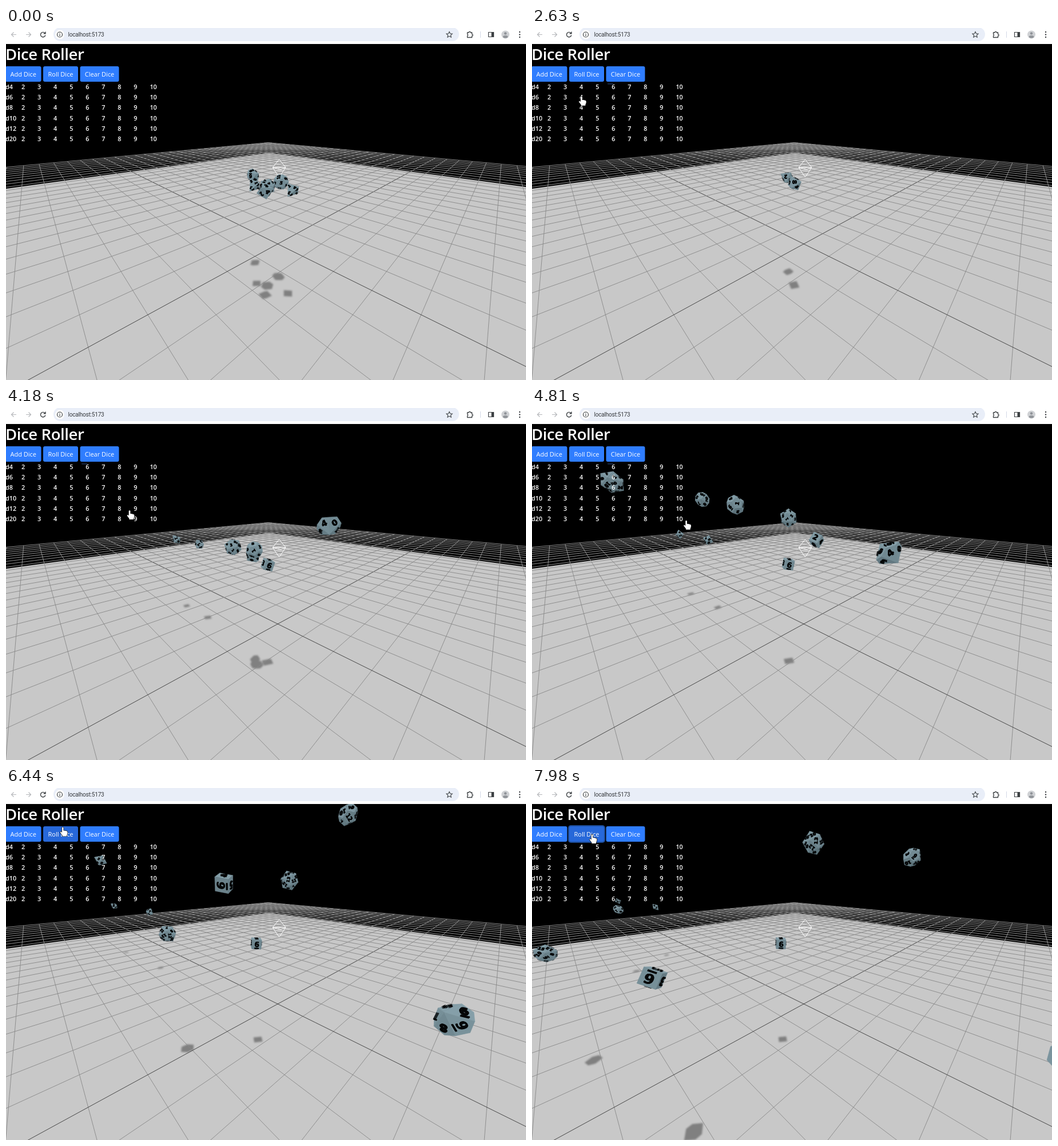
Animation, 909 px wide and 616 px high, one loop 8 s. Source, as an HTML page with a canvas:

```html
<!DOCTYPE html>
<html lang="en">
<head>
<meta charset="utf-8">
<title>Dice Roller</title>
<style>
html, body { margin: 0; width: 100%; height: 100%; overflow: hidden; background: #000; }
canvas { display: block; }
</style>
</head>
<body>
<canvas id="stage" width="909" height="616"></canvas>
<script>
const ctx = document.getElementById('stage').getContext('2d');
const LOOP = 8000, STEP = 126.67;
const SANS = '"Open Sans", "Noto Sans", sans-serif';

// ---- vectors: x right, y down, z away; the eye is the origin
const dot = (a, b) => a[0] * b[0] + a[1] * b[1] + a[2] * b[2];
const add = (a, b, k = 1) => a.map((v, i) => v + b[i] * k);
const mul = (a, k) => a.map(v => v * k);
const unit = a => mul(a, 1 / Math.hypot(...a));
const cross = (a, b) => [a[1] * b[2] - a[2] * b[1], a[2] * b[0] - a[0] * b[2], a[0] * b[1] - a[1] * b[0]];
const mean = pts => mul(pts.reduce((s, p) => add(s, p)), 1 / pts.length);

// ---- camera
const FOCAL = 385, PITCH = Math.atan2(160.5, FOCAL), EYE = 3.72;
const SIN = Math.sin(PITCH), COS = Math.cos(PITCH);
const depth = p => p[2] * COS + p[1] * SIN;
const project = p => {
  const k = FOCAL / depth(p);
  return [454.5 + p[0] * k, 322 + (p[1] * COS - p[2] * SIN) * k];
};

// ---- polyhedra
function hull(points) {
  const n = points.length, size = Math.max(...points.map(p => Math.hypot(...p)));
  const verts = points.map(p => mul(p, 1 / size)), found = new Map();
  for (let i = 0; i < n; i++) for (let j = i + 1; j < n; j++) for (let k = j + 1; k < n; k++) {
    let nor = unit(cross(add(verts[j], verts[i], -1), add(verts[k], verts[i], -1)));
    let d = dot(nor, verts[i]);
    if (d < 0) { nor = mul(nor, -1); d = -d; }
    if (verts.some(v => dot(nor, v) > d + 1e-3)) continue;
    found.set(nor.map(v => Math.round(v * 50) + 0).join(), { nor, d });
  }
  return [...found.values()].map(({ nor, d }) => {
    const pts = verts.filter(v => dot(nor, v) > d - 5e-3), mid = mean(pts);
    const x = unit(add(pts[0], mid, -1)), y = cross(nor, x);
    const angle = p => Math.atan2(dot(add(p, mid, -1), y), dot(add(p, mid, -1), x));
    pts.sort((a, b) => angle(a) - angle(b));
    return { nor, pts, mid };
  });
}

const PHI = (1 + Math.sqrt(5)) / 2, S = [-1, 1];
const cyclic = (a, b) => S.flatMap(i => S.flatMap(j => {
  const p = i * a, q = j * b;
  return [[0, p, q], [p, q, 0], [q, 0, p]];
}));
const cube = S.flatMap(x => S.flatMap(y => S.map(z => [x, y, z])));
const octa = S.flatMap(s => [[s, 0, 0], [0, s, 0], [0, 0, s]]);
const belt = Math.tan(Math.PI / 10) ** 2;
const kite = [[0, 1, 0], [0, -1, 0]];
for (let i = 0; i < 10; i++) {
  const a = i * Math.PI / 5;
  kite.push([Math.cos(a), i % 2 ? belt : -belt, Math.sin(a)]);
}
const SHAPES = {
  d4: { faces: hull(cube.filter(p => p[0] * p[1] * p[2] > 0)), size: 0.5 },
  d6: { faces: hull(cube), size: 0.9 },
  d8: { faces: hull(octa), size: 0.7 },
  d10: { faces: hull(kite), size: 0.65 },
  d12: { faces: hull(cube.concat(cyclic(1 / PHI, PHI))), size: 0.56 },
  d20: { faces: hull(cyclic(1, PHI)), size: 0.42 }
};

// ---- dice: birth time, [x, z] there, launch speed [x, z, up]
const RADIUS = 0.165, FLOOR = 2.5, GRAVITY = 1.17, BOUNCE = 0.4, LAMP = 2.85;
const dice = [];
const die = (shape, birth, from, speed = [0, 0, 0], { drag = 1e-6, until = LOOP } = {}) =>
  dice.push({ shape: SHAPES[shape], birth, from, speed, drag, until, seed: dice.length + 1 });

const cleared = { until: 950 };
die('d10', 0, [-0.31, 5.2], undefined, cleared);
die('d4', 0, [-0.23, 4.34], undefined, cleared);
die('d20', 0, [0.03, 4.26], undefined, cleared);
die('d12', 0, [0.32, 4.6], undefined, cleared);
die('d8', 0, [-0.02, 3.95], undefined, cleared);
die('d4', 0, [0.51, 4.0], undefined, cleared);

die('d8', 2500, [0.1, 4.6], [-1.25, 1.22, 0.4]);
die('d8', 2640, [0, 4.3], [2.4, -1, 2.8], { until: 4100 });
die('d6', 2750, [0.65, 4.15], [-0.72, 0.28, 0.2], { drag: 0.8 });
die('d10', 2900, [0, 4.4], [0.8, -1.22, 1.45], { drag: 0.3 });
die('d8', 3500, [-1.6, 6.3], [-2.1, 1.85, 0.2]);
die('d20', 4000, [0, 4.3], [-3.5, -0.5, 2.3], { until: 5300 });
die('d12', 4000, [0, 4.3], [-1.26, 0, 1.88], { until: 5600 });
die('d10', 4100, [0, 4.3], [-3.5, 2.4, 2.15], { drag: 0.4 });
die('d20', 4200, [-0.28, 4.3], [0.35, 0, 1.85], { until: 5730 });
die('d6', 4500, [0.69, 4.64], [-0.65, -0.68, 1.75]);
die('d12', 4850, [0.5, 4.4], [0.57, 0.1, 2.35]);
die('d20', 5340, [0, 4.45], [-1.68, -0.25, 0.9]);
die('d20', 5730, [0.46, 4.45], [-0.06, -0.27, 2.09]);

function rotator(angles) {
  const c = angles.map(Math.cos), s = angles.map(Math.sin);
  return ([x, y, z]) => {
    [y, z] = [y * c[0] - z * s[0], y * s[0] + z * c[0]];
    [x, z] = [x * c[1] + z * s[1], z * c[1] - x * s[1]];
    return [x * c[2] - y * s[2], x * s[2] + y * c[2], z];
  };
}

function pose(d, t) {
  let s = (t - d.birth) / 1000, up = d.speed[2];
  const run = (1 - Math.exp(-d.drag * s)) / d.drag;
  while (up > 0.1 && s > 2 * up / GRAVITY) {
    s -= 2 * up / GRAVITY;
    up *= BOUNCE;
  }
  const height = FLOOR + (up > 0.1 ? up * s - GRAVITY * s * s / 2 : 0);
  const center = [d.from[0] + d.speed[0] * run, EYE - height, d.from[1] + d.speed[1] * run];
  const roll = run * Math.hypot(d.speed[0], d.speed[1]) * 0.9;
  const turn = rotator([d.seed * 1.3 + roll, d.seed * 0.8 + roll * 0.6, d.seed * 2.1]);
  const place = p => add(center, turn(p), RADIUS);
  const faces = d.shape.faces.map((f, i, all) => ({
    nor: turn(f.nor), mid: place(f.mid), pts: f.pts.map(place), label: all.length === 10 ? i : i + 1
  }));
  return { center, height, faces, size: d.shape.size * RADIUS, far: depth(center) };
}

function outline(pts) {
  pts.map(project).forEach((p, i) => i ? ctx.lineTo(...p) : ctx.moveTo(...p));
  ctx.closePath();
}

// Raised numeral: a few copies lifted off the face.
function stamp(text, pos, nor, up, size) {
  const down = mul(up, -1), right = cross(nor, down);
  ctx.fillStyle = '#050708';
  for (let lift = 0; lift < 0.12; lift += 0.035) {
    const p = add(pos, nor, lift * RADIUS);
    const o = project(p), x = project(add(p, right, size / 2)), y = project(add(p, down, size / 2));
    ctx.setTransform((x[0] - o[0]) / 10, (x[1] - o[1]) / 10, (y[0] - o[0]) / 10, (y[1] - o[1]) / 10, ...o);
    ctx.fillText(text, 0, 1);
    if (text === 6 || text === 9) ctx.fillRect(-6, 9, 12, 2.5);
  }
  ctx.resetTransform();
}

function number(f, size, count) {
  if (count === 4) {
    f.pts.forEach((p, i) => {
      const up = unit(add(p, f.mid, -1));
      stamp(1 + (f.label + i) % 4, add(f.mid, up, 0.48 * RADIUS), f.nor, up, size);
    });
  } else {
    const top = count === 6 ? mean(f.pts.slice(0, 2)) : f.pts[0];
    stamp(f.label, f.mid, f.nor, unit(add(top, f.mid, -1)), size);
  }
}

function drawDie({ faces, size }) {
  ctx.font = 'bold 20px "DejaVu Sans", sans-serif';
  ctx.textAlign = 'center';
  ctx.textBaseline = 'middle';
  const facing = f => -dot(f.nor, unit(f.mid));
  const front = faces.filter(f => facing(f) > 0);
  faces.filter(f => facing(f) <= 0 && facing(f) > -0.3).forEach(f => number(f, size, faces.length));
  for (const f of front) {
    const k = Math.min(1, Math.max(0, 0.5 - f.nor[1] * 0.5 - f.nor[0] * 0.1));
    ctx.fillStyle = ctx.strokeStyle = `rgb(${90 + 44 * k},${112 + 48 * k},${120 + 50 * k})`;
    ctx.lineWidth = 0.6;
    ctx.beginPath();
    outline(f.pts);
    ctx.fill();
    ctx.stroke();
  }
  front.forEach(f => number(f, size, faces.length));
}

// ---- ground, turned by 45 degrees
const PLANE = 15.5, GRID = 25, NEAR = -10.4;
const ground = (u, v) => [0.382 + (v - u) * Math.SQRT1_2, EYE, 6.217 + (u + v) * Math.SQRT1_2];

function gridLines(color, middle) {
  ctx.lineWidth = 0.9;
  for (let i = -GRID; i <= GRID; i++) {
    const near = Math.max(-GRID, NEAR - i);
    if (near >= GRID) continue;
    ctx.strokeStyle = i ? color : middle;
    ctx.beginPath();
    ctx.moveTo(...project(ground(i, near)));
    ctx.lineTo(...project(ground(i, GRID)));
    ctx.moveTo(...project(ground(near, i)));
    ctx.lineTo(...project(ground(GRID, i)));
    ctx.stroke();
  }
}

function drawGround(live) {
  gridLines('#a0a0a0', '#a0a0a0');
  ctx.save();
  ctx.beginPath();
  [ground(PLANE, -PLANE), ground(PLANE, PLANE), ground(-PLANE, PLANE)].forEach(p => ctx.lineTo(...project(p)));
  ctx.lineTo(1620, 700);
  ctx.lineTo(-670, 700);
  ctx.fillStyle = '#c8c8c8';
  ctx.fill();
  ctx.clip();
  // Only dice below the lamp cast a shadow, straight down.
  ctx.beginPath();
  for (const p of live) if (p.height < LAMP) {
    for (const f of p.faces) if (f.nor[1] < 0) outline(f.pts.map(([x, , z]) => [x, EYE, z]));
  }
  ctx.fillStyle = 'rgba(0,0,0,.36)';
  ctx.filter = 'blur(1.6px)';
  ctx.fill();
  ctx.filter = 'none';
  gridLines('#888', '#383838');
  ctx.restore();
}

// ---- interface
function stroke(color, width, path) {
  ctx.strokeStyle = color;
  ctx.lineWidth = width;
  ctx.stroke(new Path2D(path));
}

function disc(x, y, r, color) {
  ctx.fillStyle = color;
  ctx.beginPath();
  ctx.arc(x, y, r, 0, 7);
  ctx.fill();
}

function box(x, y, w, h, r, color) {
  ctx.fillStyle = color;
  ctx.beginPath();
  ctx.roundRect(x, y, w, h, r);
  ctx.fill();
}

function label(text, x, y, font, color = '#fff', align = 'left') {
  ctx.font = font;
  ctx.fillStyle = color;
  ctx.textAlign = align;
  ctx.textBaseline = 'alphabetic';
  ctx.fillText(text, x, y);
}

const CLICKS = { clear: 860, add: 1740, roll: 7420 };
const pressed = (name, t) => t > CLICKS[name] && t < CLICKS[name] + 140;

function button(text, x, w, press, hover, focus) {
  if (focus) box(x - 2, 65, w + 4, 31, 5, '#1c4a94');
  box(x, 67, w, 27, 3, press ? '#5f7079' : hover ? '#2768d9' : '#2f7dff');
  label(text, x + w / 2, 85, `500 11px ${SANS}`, '#fff', 'center');
}

function drawPanel(t) {
  ctx.letterSpacing = '-0.4px';
  label('Dice Roller', -1, 56, `600 27.5px ${SANS}`);
  ctx.letterSpacing = '0px';
  button('Add Dice', -1, 62.5, pressed('add', t), t > 1400 && t < 2250);
  button('Roll Dice', 65, 61, pressed('roll', t), t > 6300, t > 7560);
  button('Clear Dice', 129.5, 68, pressed('clear', t), t > 700 && t < 1200, t > 1000 && t < 1740);
  if (t > 1200 && t < 5200) box(132, 96.5, 10, 2.5, 1, '#162238');
  [4, 6, 8, 10, 12, 20].forEach((n, row) => {
    const y = 107 + row * 18.2, font = `600 10.8px ${SANS}`;
    label('d' + n, -1, y, font);
    for (let c = 2; c <= 10; c++) label(c, 27 + (c - 2) * 28.05, y, font);
  });
}

function drawBrowser() {
  ctx.fillStyle = '#fff';
  ctx.fillRect(0, 0, 909, 28);
  box(83, -1, 709, 24, 12, '#e9eef8');
  stroke('#b5b7ba', 1.2, 'M18 11.5H9.5M13.5 7.5l-4 4 4 4M35 11.5h8.5M39.5 7.5l4 4-4 4');
  stroke('#3c4043', 1.4, 'M68 9a4.2 4.2 0 1 0 .8 3.5M69 6.5v3.300h-3.300');
  disc(94, 11.5, 8, '#fff');
  stroke('#3c4043', 1.2, 'M98.5 11.5a4.5 4.5 0 1 1-9 0a4.5 4.5 0 1 1 9 0M94 11v3M94 8.8v1.2');
  ctx.letterSpacing = '-0.2px';
  label('localhost:5173', 108.5, 15, '10px Roboto, sans-serif', '#35383c');
  ctx.letterSpacing = '0px';
  stroke('#3c4043', 1.1, 'M775 6.5l1.500 3.300 3.600.4-2.700 2.400.8 3.600-3.200-1.900-3.200 1.900.8-3.600-2.700-2.400 3.600-.4z');
  stroke('#3c4043', 1.3, 'M806.5 8h2.500a1.600 1.600 0 0 1 3.200 0h2.300v2.800a1.600 1.600 0 0 1 0 3.200v2.500h-8v-2.700a1.600 1.600 0 0 0 0-3z');
  stroke('#d3d9e6', 1, 'M829.5 6v11');
  stroke('#3c4043', 1.2, 'M843.5 7.5h9v8h-9z');
  ctx.fillStyle = '#3c4043';
  ctx.fillRect(848.5, 7.5, 4, 8);
  disc(873, 11.5, 7, '#cfd1d4');
  disc(873, 9.5, 2.3, '#909499');
  ctx.beginPath();
  ctx.ellipse(873, 15.3, 4.2, 2.4, 0, 0, 7);
  ctx.fill();
  for (const y of [7, 11.5, 16]) disc(898, y, 1.2, '#3c4043');
}

// ---- mouse: time, x, y
const TRAIL = [[120, 884, 598], [507, 211, 104], [740, 165, 82], [1080, 165, 82], [1500, 32, 88],
  [2020, 32, 88], [3410, 150, 157], [4810, 270, 197], [6440, 99, 68], [7100, 105, 81]];
const HAND = new Path2D('M-1.3 1Q0-.6 1.3 1V6L4 6.3 7.5 7.2 8.3 8.5V11L7 14.5V16H-.5V14.5L-4.3 9.5Q-4.3 7.8-2.8 8.2L-1.3 9.5Z');
const ARROW = new Path2D('M0 0V14L3.3 11 5.5 16 7.6 15 5.5 10.3H10Z');

function mouse(t) {
  const next = TRAIL.findIndex(k => k[0] > t);
  if (next < 1) return TRAIL[TRAIL.length - 1].slice(1);
  const a = TRAIL[next - 1], b = TRAIL[next], k = (t - a[0]) / (b[0] - a[0]);
  return [a[1] + (b[1] - a[1]) * k, a[2] + (b[2] - a[2]) * k];
}

function drawCursor(t) {
  if (t < TRAIL[0][0]) return;
  const [x, y] = mouse(t);
  if (Object.keys(CLICKS).some(name => pressed(name, t))) disc(x - 1, y, 9, 'rgba(150,180,85,.8)');
  const shape = t < 700 ? ARROW : HAND;
  ctx.save();
  ctx.translate(x, y);
  ctx.fillStyle = '#fff';
  ctx.strokeStyle = '#111';
  ctx.lineWidth = 1.4;
  ctx.stroke(shape);
  ctx.fill(shape);
  ctx.restore();
}

function draw(t) {
  ctx.fillStyle = '#000';
  ctx.fillRect(0, 0, 909, 616);
  const live = dice
    .filter(d => t >= d.birth && t < d.until)
    .map(d => pose(d, t))
    .filter(p => p.far > 0.6)
    .sort((a, b) => b.far - a.far);
  drawGround(live);
  stroke('#fff', 1, 'M477.5 230L466 244 477.5 261 489 244ZM466 244H489M466 244L480 247.5 489 244');
  live.forEach(drawDie);
  drawPanel(t);
  drawBrowser();
  drawCursor(t);
}

const start = performance.now();
function tick() {
  const t = (performance.now() - start) % LOOP;
  draw(Math.floor((t + 31) / STEP) * STEP);
  requestAnimationFrame(tick);
}
tick();
</script>
</body>
</html>
```
